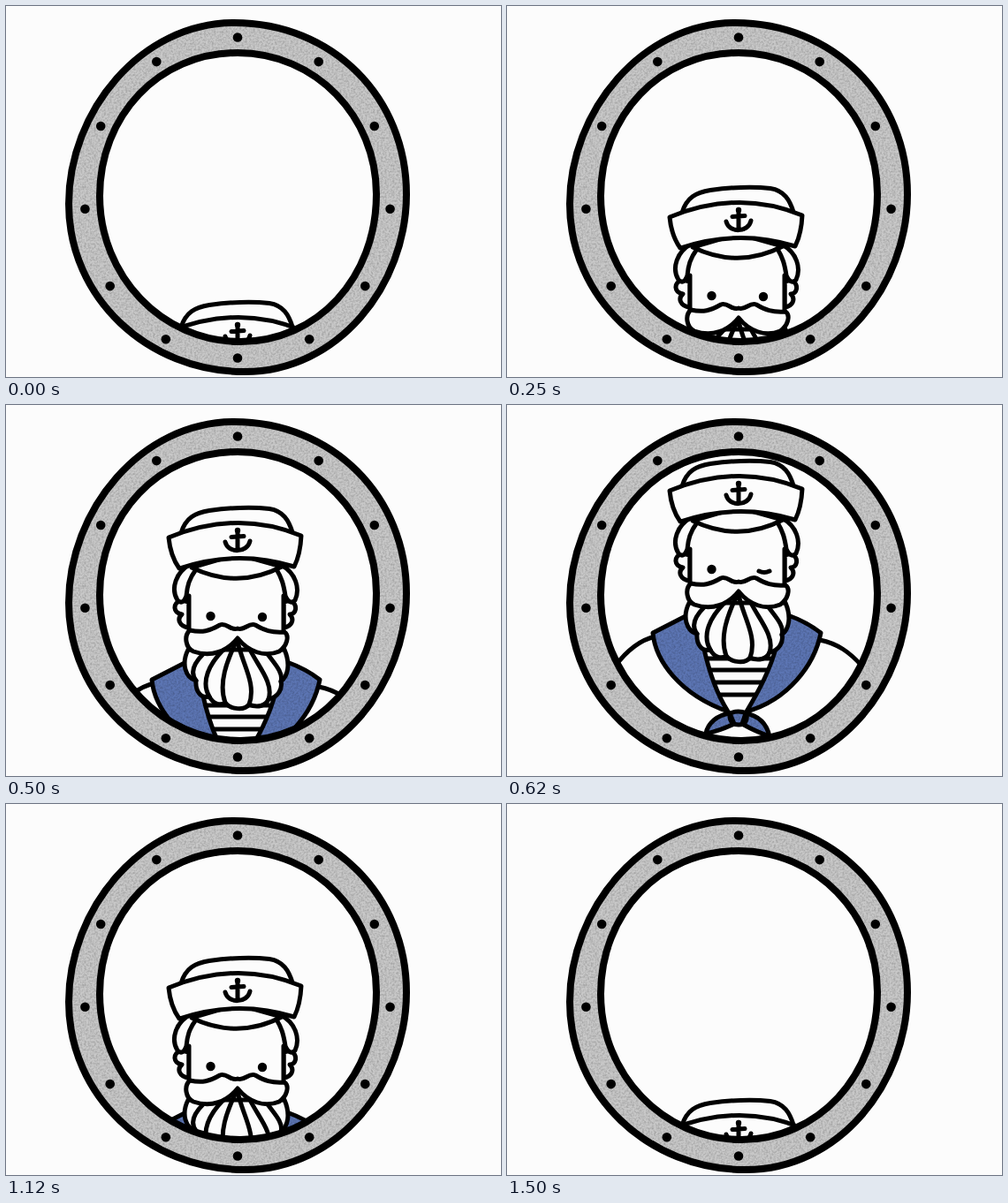
Animation of 560 by 420 pixels, one loop 2000 ms. Source, as an HTML page:

```html
<!DOCTYPE html>
<html lang="en">
<head>
<meta charset="utf-8">
<title>Sailor in a porthole</title>
<style>
  html, body { margin: 0; width: 100%; height: 100%; overflow: hidden; background: #fcfcfc; }
  svg { display: block; width: 100vw; height: 100vh; }
  .ink { stroke: #000; stroke-width: 5; stroke-linecap: round; stroke-linejoin: round; }
  .line { fill: none; }
  .white { fill: #fcfcfc; }
  .blue { fill: #5c75b3; }
  .rim { fill: none; stroke: #000; stroke-width: 8; }
</style>
</head>
<body>
<svg viewBox="0 0 560 420">
  <defs>
    <path id="inner" d="M262 53C350 53 419 125 419 213C419 308 352 380 265 380C176 380 106 305 106 215C106 125 172 53 262 53Z"/>
    <path id="outer" d="M258 19C370 19 453 104 453 213C453 316 376 414 270 414C160 414 71 330 71 224C71 119 153 19 258 19Z"/>
    <clipPath id="hole"><use href="#inner"/></clipPath>
    <filter id="grain" x="0" y="0" width="1" height="1" color-interpolation-filters="sRGB">
      <feTurbulence type="fractalNoise" baseFrequency=".45" numOctaves="2" seed="4"/>
      <feColorMatrix values="0 0 0 0 0  0 0 0 0 0  0 0 0 0 0  .4 0 0 0 -.15"/>
      <feComposite in2="SourceGraphic" operator="in" result="specks"/>
      <feMerge><feMergeNode in="SourceGraphic"/><feMergeNode in="specks"/></feMerge>
    </filter>
  </defs>

  <g clip-path="url(#hole)">
    <g id="sailor" class="ink">
      <!-- shirt -->
      <path class="white" d="M190 254L168 262C150 266 134 280 122 296V440H402V296C388 280 374 270 354 266L330 254Z"/>
      <path class="line" d="M226 287h72M228 300h68M234 314h56M240 328h44"/>
      <!-- collar and scarf -->
      <g stroke="none" class="blue" filter="url(#grain)">
        <path id="collar" d="M204 238L165 258C168 290 196 328 250 347C236 325 228 300 222 272ZM318 238Q340 246 355 258C348 294 318 334 271 347C284 325 298 300 305 272Z"/>
        <path id="tails" d="M252 349C238 351 227 360 225 372Q240 369 257 361ZM270 349C286 352 294 362 297 375Q282 370 266 361Z"/>
        <path id="knot" d="M252 349Q262 345 271 349Q273 362 262 362Q251 362 252 349Z"/>
      </g>
      <g class="line"><use href="#collar"/><use href="#tails"/><use href="#knot"/></g>
      <!-- beard -->
      <path class="white" d="M206 224C198 240 203 256 215 259C214 270 220 280 230 277C234 285 242 288 248 284C254 292 270 293 275 286C284 290 294 288 297 280C308 278 313 268 311 260C319 254 322 240 315 224Z"/>
      <path class="line" d="M223 229C212 240 208 250 215 259M246 224C230 240 220 260 230 277M261 214C250 236 240 262 248 284M262 214C266 238 284 262 275 286M276 224C286 244 303 262 297 280M296 229C304 240 314 250 311 260"/>
      <!-- head -->
      <path class="white" d="M198 168C188 172 189 182 199 184C193 189 196 198 207 199V170ZM322 168C331 174 328 184 321 184C327 190 323 198 314 199V170Z"/>
      <path class="white" stroke="none" d="M207 130H314V206H207Z"/>
      <path class="line" d="M207 163V202M314 163V202"/>
      <path class="white" d="M209 127C192 136 186 155 194 168Q200 174 204 163C205 152 207 144 215 133ZM311 128C328 137 333 155 327 168Q321 174 316 163C314 150 312 143 306 133Z"/>
      <path class="white" d="M210 131Q262 156 312 130L262 116Z"/>
      <g stroke="none">
        <circle cx="231.5" cy="186" r="5.2"/>
        <circle id="eye" cx="290" cy="187" r="5.2"/>
      </g>
      <path id="wink" class="line" d="M285 188Q291 191 297 188"/>
      <path class="white" d="M262 200C254 203 250 193 242 196C230 203 222 205 208 202C201 208 203 222 212 226C232 233 250 226 262 211C274 226 292 233 309 226C318 220 321 208 315 204C300 205 292 202 282 196C274 193 270 203 262 200Z"/>
      <!-- cap -->
      <path class="white" d="M198 92C203 75 214 69 230 66.500Q270 61 298 64.500C314 67 320 78 324 91Z"/>
      <path class="white" d="M184 97Q262 65 334 95Q333 116 326 130Q262 110 196 132Q186 118 184 97Z"/>
      <path class="line" d="M262 90V111M255 96.500L269 95.500M248 102C251 115 273 115 276 101"/>
      <circle cx="262" cy="89" r="3.200" stroke="none"/>
    </g>
  </g>

  <path id="band" fill="#c8c8c8" fill-rule="evenodd" filter="url(#grain)"/>
  <use href="#outer" class="rim"/>
  <use href="#inner" class="rim"/>
  <g id="bolts"></g>
</svg>
<script>
  const $ = id => document.getElementById(id);
  const LOOP = 2000, STEP = 125, FALL_AT = 7;

  // Distance below the raised pose, one value per step
  const rise = [272, 184, 142, 111, 53, 0];
  const fall = [0, 53, 111, 184, 228, 272];

  // Twelve bolts round the rim, spread a little towards the sides
  function bolt(i) {
    const a = i * Math.PI / 6 + .07 * Math.sin(i * Math.PI / 6);
    const x = 262 + 173 * Math.sin(a), y = 217 - 181.5 * Math.cos(a);
    return `<circle cx="${x}" cy="${y}" r="5.3"/>`;
  }

  function dropAt(ms) {
    const n = Math.floor((ms % LOOP + 5) / STEP);
    const [keys, i] = n > FALL_AT && n < LOOP / STEP ? [fall, n - FALL_AT] : [rise, n % (LOOP / STEP)];
    return keys[Math.min(i, keys.length - 1)];
  }

  function draw(ms) {
    const drop = dropAt(ms);
    const winking = drop === 0;
    $('sailor').setAttribute('transform', `translate(0 ${drop})`);
    $('eye').style.display = winking ? 'none' : '';
    $('wink').style.display = winking ? '' : 'none';
  }

  $('band').setAttribute('d', $('outer').getAttribute('d') + $('inner').getAttribute('d'));
  $('bolts').innerHTML = Array.from({ length: 12 }, (_, i) => bolt(i)).join('');

  const begin = performance.now();
  function tick() {
    draw(performance.now() - begin);
    requestAnimationFrame(tick);
  }
  tick();
</script>
</body>
</html>
```
